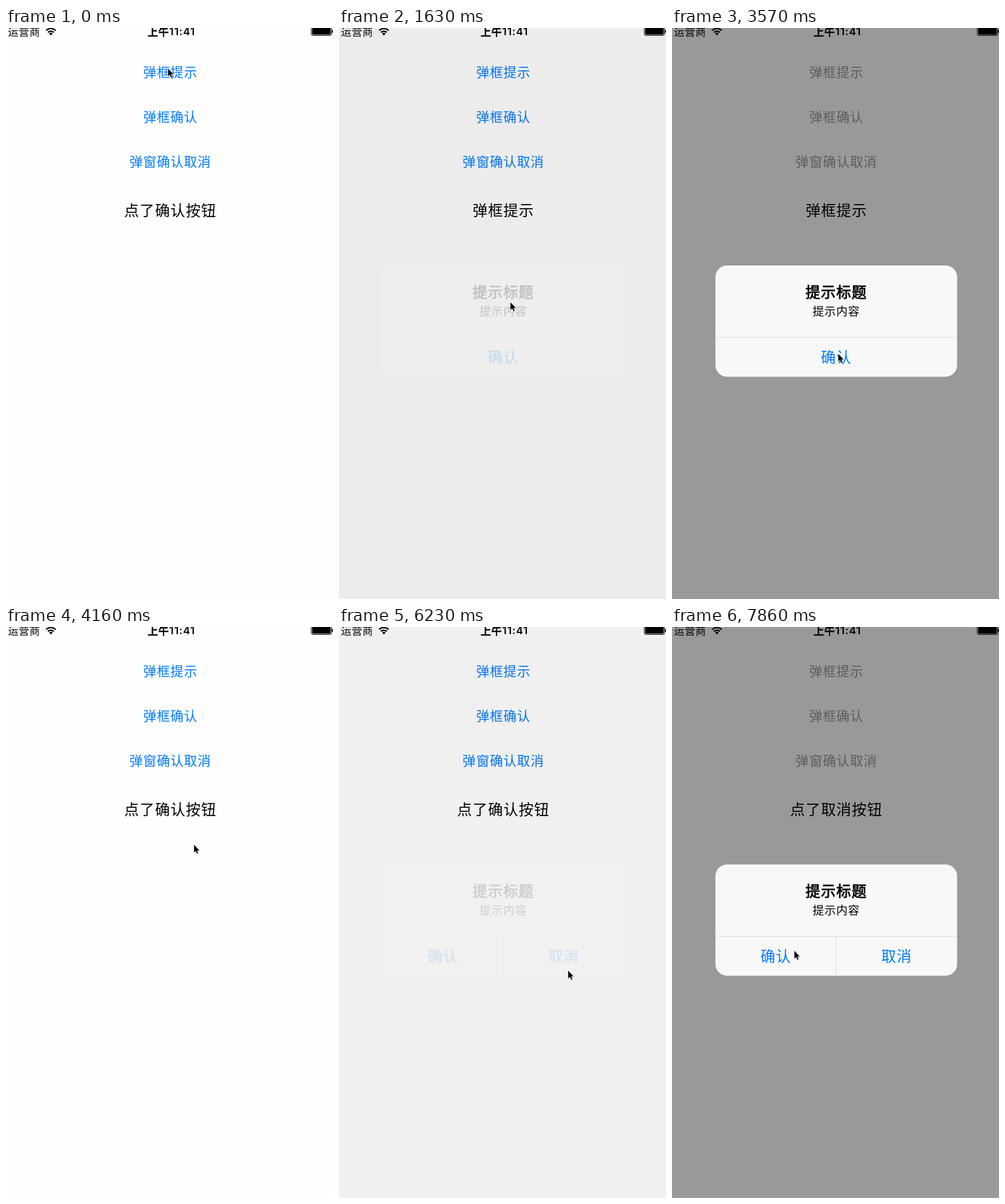
These frames come from a looping animation (548x957 px, 8 s). An HTML page:

```html
<!DOCTYPE html>
<html lang="zh-CN">
<head>
<meta charset="utf-8">
<title>弹框</title>
<style>
  html, body { margin: 0; width: 100%; height: 100%; overflow: hidden; background: #fefefe; }
  svg { display: block; width: 548px; height: 957px; }
  text { font-family: "Noto Sans CJK SC", "Noto Sans CJK", sans-serif; text-anchor: middle; }
  .button { font-size: 22px; letter-spacing: .8px; fill: #007aff; }
  .dimmed .button { fill: #999; }
  .label, .title, .action { font-size: 24.8px; letter-spacing: 1px; }
  .title, .time { stroke: #000; stroke-width: .8; }
  .detail { font-size: 19px; letter-spacing: .8px; }
  .action { fill: #007aff; }
  .status { font-size: 17.5px; letter-spacing: .5px; text-anchor: start; }
  .digits { font-family: Inter, sans-serif; font-weight: 600; letter-spacing: .9px; }
  .rule { stroke: #dedee0; stroke-width: 1; }
  .wifi { fill: none; stroke: #000; stroke-width: 2.4; }
</style>
</head>
<body>
<svg viewBox="0 0 548 957">
  <g id="page">
    <text class="status" x="3.2" y="12.6">运营商</text>
    <path class="wifi" d="M67.2 4.2A11.4 11.4 0 0 1 83.2 4.2M70.3 7.4A7 7 0 0 1 80.1 7.4"/>
    <path d="M75.2 12.4L72.2 9.3A4.2 4.2 0 0 1 78.2 9.3Z"/>
    <text class="status time" x="237.2" y="12.6">上午</text>
    <text class="status digits" x="273.6" y="12.3">11:41</text>
    <rect x="511.6" y="-1.5" width="34" height="14" rx="2.6" fill="none" stroke="#000"/>
    <rect x="513" y="-1" width="31.2" height="12.2" rx="1.4"/>
    <rect x="546.4" y="3.2" width="1.6" height="5" rx=".8"/>
    <text class="button" x="275.5" y="82.2">弹框提示</text>
    <text class="button" x="275.5" y="157">弹框确认</text>
    <text class="button" x="275.5" y="232">弹窗确认取消</text>
    <text class="label" id="label" x="275.5" y="315"></text>
  </g>
  <rect id="dim" width="548" height="957"/>
  <g id="alert">
    <rect x="73" y="398" width="405" height="186.5" rx="19.5" fill="#f8f8f8"/>
    <text class="title" x="275.5" y="452.4">提示标题</text>
    <text class="detail" x="275.5" y="482.2">提示内容</text>
    <path class="rule" d="M73 518.5H478"/>
    <text class="action" id="single" x="275.5" y="561.4">确认</text>
    <g id="pair">
      <path class="rule" d="M275.5 519V584.5"/>
      <text class="action" x="174.3" y="561.4">确认</text>
      <text class="action" x="376.8" y="561.4">取消</text>
    </g>
  </g>
  <g id="cursor">
    <path d="M.5 1.6V15.6L3.7 12.9L5.8 17.5L8.2 16.5L6.2 12H10.6Z" opacity=".25"/>
    <path d="M.6 1V13.9L3.5 11.2L5.6 15.9L7.6 15L5.6 10.5H9.6Z" stroke="#fff" stroke-width="1.4" paint-order="stroke"/>
  </g>
</svg>
<script>
const LOOP = 8000, FIRST = 140, STEP = 148.3;
const $ = id => document.getElementById(id);
const buttons = document.querySelectorAll(".button");

// Each alert: button tapped, press, shown, dismissed, has two actions
const alerts = [
  { button: 0, press: 135, show: 330, hide: 1450, two: false },
  { button: 1, press: 2080, show: 2259, hide: 3640, two: false },
  { button: 2, press: 5030, show: 5045, hide: 6030, two: true },
  { button: 2, press: 7100, show: 7220, hide: Infinity, two: true }
];
const labels = [
  [0, "点了确认按钮"], [330, "弹框提示"], [4044, "点了确认按钮"], [6434, "点了取消按钮"]
];
// Pointer stops: time, x, y
const path = [
  [0, 271, 67], [400, 271, 67], [1178, 292, 531], [1520, 292, 531],
  [2060, 264.5, 152], [2370, 264.5, 152], [2513, 267, 224], [3254, 278, 545],
  [3660, 278, 545], [4144, 314.5, 364], [4590, 286, 231], [4738, 284, 224],
  [5080, 284, 224], [5330, 333, 319], [5927, 383.5, 575], [6230, 383.5, 575],
  [6960, 270, 215], [7240, 270, 215], [7704, 220, 495], [7852, 204.5, 542], [LOOP, 204.5, 542]
];

// Critically damped spring from 0 to 1
function spring(ms) {
  const x = Math.max(0, ms) * 0.01826;
  return 1 - (1 + x) * Math.exp(-x);
}

function pointerAt(t) {
  const i = Math.max(1, path.findIndex(p => p[0] >= t));
  const [t0, x0, y0] = path[i - 1], [t1, x1, y1] = path[i];
  const u = (t - t0) / (t1 - t0);
  return [x0 + (x1 - x0) * u, y0 + (y1 - y0) * u];
}

function buttonAlpha(i, t) {
  const tap = alerts.filter(a => a.button === i && t >= a.press).pop();
  return tap ? Math.min(1, 0.2 + 0.8 * Math.max(0, t - tap.show) / 350) : 1;
}

function draw(t) {
  const current = alerts.filter(a => t >= a.show).pop();
  let shown = 0, scale = 1;
  if (current) {
    const entry = spring(t - current.show);
    shown = entry * (1 - spring(t - current.hide));
    scale = 1.2 - 0.2 * entry;
    $("single").style.display = current.two ? "none" : "";
    $("pair").style.display = current.two ? "" : "none";
  }
  $("page").classList.toggle("dimmed", !!current && t < current.hide);
  buttons.forEach((b, i) => b.setAttribute("opacity", buttonAlpha(i, t)));
  $("label").textContent = labels.filter(l => t >= l[0]).pop()[1];
  $("dim").setAttribute("opacity", 0.4 * shown);
  $("alert").setAttribute("opacity", shown < 0.004 ? 0 : shown);
  $("alert").setAttribute("transform",
    `translate(275.3 491.2) scale(${scale}) translate(-275.5 -491.2)`);
  $("cursor").setAttribute("transform", `translate(${pointerAt(t)})`);
}

const start = performance.now();
function tick() {
  const t = (performance.now() - start) % LOOP;
  draw(t < FIRST ? 0 : FIRST + STEP * Math.floor((t - FIRST) / STEP));
  requestAnimationFrame(tick);
}
tick();
</script>
</body>
</html>
```
